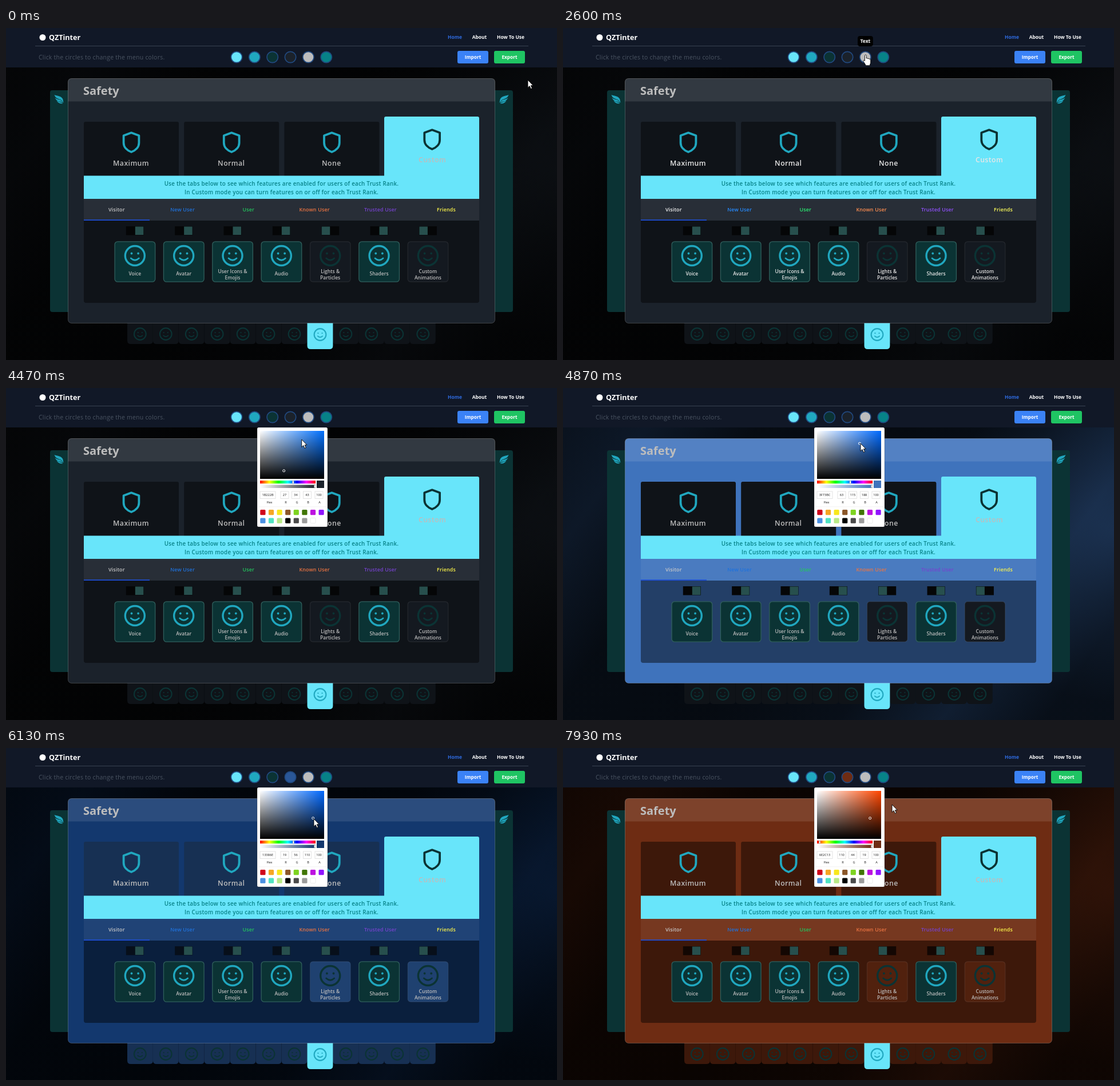
Recreate the animation shown at these times as an HTML page. Size 963 by 581 pixels, loop 8000 ms.

```html
<!DOCTYPE html>
<html lang="en">
<head>
<meta charset="utf-8">
<title>Menu colour editor</title>
<style>
html, body { margin: 0; width: 100%; height: 100%; overflow: hidden; background: #000; }
svg { display: block; width: 963px; height: 581px; font-family: "Open Sans", "Noto Sans", sans-serif; font-weight: 600; }
.bold { font-weight: 700; }
.mid { text-anchor: middle; }
.line { fill: none; stroke: currentColor; stroke-linecap: round; stroke-linejoin: round; }
.icon { color: #20a7bf; }
.dark { color: #0b3334; }
.field { fill: #fff; stroke: #ddd; stroke-width: .8; }
.tiny { font: 5.6px "Noto Sans", sans-serif; fill: #222; text-anchor: middle; }
</style>
</head>
<body>
<svg id="stage" viewBox="0 0 963 581"></svg>
<script>
const LOOP = 8000;
const stage = document.getElementById('stage');
const clamp = x => Math.max(0, Math.min(1, x));
const rgb = (c, k = 1) => `rgb(${c.map(v => Math.round(v * k))})`;
const mix = (a, b, k) => a.map((v, i) => v + (b[i] - v) * k);

const rect = (x, y, w, h, fill, r = 0, more = '') =>
  `<rect x="${x}" y="${y}" width="${w}" height="${h}" rx="${r}" fill="${fill}" ${more}/>`;
const text = (x, y, size, fill, str, cls = 'mid', gap = 0) =>
  `<text x="${x}" y="${y}" font-size="${size}" fill="${fill}" class="${cls}" letter-spacing="${gap}">${str}</text>`;
const each = (list, fn) => list.map(fn).join('');

const GREY = '#bdbdbd', CYAN = '#68e5fa', GREEN = '#0b3334', TEAL = '#078288';

// Hover groups: h0 highlight, h1 icons, h2 buttons, h3 background, h4 text, h5 accent
const swatches = [
  ['Highlight', CYAN], ['Icons', '#20a7bf'], ['Buttons', GREEN],
  ['Background', 'var(--dot)'], ['Text', GREY], ['Accent', TEAL]];
const swatchX = i => 403 + i * 31.35;

const shield = (x, y, cls) => `<path class="line ${cls}" stroke-width="3.8" transform="translate(${x} ${y})"
  d="M0-16.7L13.4-11.7V1C13.4 9 7 14.5 0 17C-7 14.5-13.4 9-13.4 1V-11.7Z"/>`;

const face = (x, y, s, cls) => `<g class="${cls}" transform="translate(${x} ${y}) scale(${s})">
  <circle class="line" r="17" stroke-width="3.4"/>
  <circle cx="-5.8" cy="-4" r="1.9" fill="currentColor"/><circle cx="5.8" cy="-4" r="1.9" fill="currentColor"/>
  <path class="line" stroke-width="2.8" d="M-7 4.5Q0 11 7 4.5"/></g>`;

const wing = (x, flip) => `<g class="h1 icon" transform="translate(${x} 117) scale(${flip} 1)" fill="currentColor">
  <path d="M0 0C5 2 13 2 15 8L16 14L12 9C7 7 2 6 0 0Z"/>
  <path d="M1 5C4 8 9 8 12 10L15 14L11 12C6 12 3 9 1 5Z"/>
  <path d="M4 10C7 12 10 12 15 15C10 16 6 14 4 10Z"/></g>`;

const button = (x, fill, label) => rect(x, 40, 54, 22, fill, 3) + text(x + 27, 54, 8.3, '#fff', label, 'mid bold');

function header() {
  return rect(0, 0, 963, 69, '#111827') + rect(51, 31, 862, 1, '#3a4353') +
    '<circle cx="64" cy="16.5" r="5.5" fill="#fff"/>' +
    text(75, 21, 12.6, '#fff', 'QZTinter', 'bold') +
    text(784.5, 19, 8.4, '#2f6be0', 'Home', 'mid bold') +
    text(827.5, 19, 8.4, '#fff', 'About', 'mid bold') +
    text(882, 19, 8.4, '#fff', 'How To Use', 'mid bold') +
    `<g font-weight="400">${text(57, 55, 10.5, '#4b5563', 'Click the circles to change the menu colors.', '', .23)}</g>` +
    each(swatches, ([, fill], i) =>
      `<circle cx="${swatchX(i)}" cy="51" r="9.7" style="fill:${fill}" stroke="#21497f" stroke-width="1.7"/>`) +
    button(789, '#3b82f6', 'Import') + button(853, '#1fc463', 'Export');
}

function levels() {
  const names = ['Maximum', 'Normal', 'None'];
  return each(names, (name, i) => {
    const x = 136 + i * 175.2;
    return `<g class="h3">${rect(x, 164, 166, 98, 'var(--card)', 3)}${shield(x + 83, 200, 'h1 icon')}
      ${text(x + 82.5, 241, 12.3, GREY, name, 'mid h4', .4)}</g>`;
  }) +
  `<g class="h0">${rect(661, 155, 166, 120, CYAN, 3)}${rect(136, 258.5, 691, 40.5, CYAN)}
    ${shield(744.7, 195, 'h2 dark')}${text(745, 234.5, 12.3, GREY, 'Custom', 'mid h4', .4)}
    <g class="h5">${text(481.5, 275.5, 9.8, TEAL, 'Use the tabs below to see which features are enabled for users of each Trust Rank.', 'mid', .25)}
    ${text(481.5, 290.5, 9.8, TEAL, 'In Custom mode you can turn features on or off for each Trust Rank.', 'mid', .25)}</g></g>`;
}

function ranks() {
  const tabs = [['Visitor', '#c8c8c8'], ['New User', '#1f72dc'], ['User', '#22c55e'],
    ['Known User', '#ec7442'], ['Trusted User', '#7642cf'], ['Friends', '#fdf64a']];
  return rect(136, 299, 691, 38, '#fff', 0, 'opacity=".055"') +
    rect(136, 335.3, 115, 1.7, '#1d4ed8') +
    each(tabs, ([name, fill], i) => text(193.3 + i * 115.25, 321, 8.8, fill, name, 'mid h4', .22));
}

function features() {
  const items = [['Voice'], ['Avatar'], ['User Icons &amp;', 'Emojis'], ['Audio'],
    ['Lights &amp;', 'Particles'], ['Shaders'], ['Custom', 'Animations']];
  return `<path d="M136 337H827V477Q827 481 823 481H140Q136 481 136 477Z" fill="var(--dim)"/>` +
    each(items, (lines, i) => {
      const x = 225.3 + i * 85.35, off = i === 4 || i === 6;
      return `<g class="h3">${rect(x - 15.5, 347, 31, 15.5, 'var(--knob)')}
        ${rect(off ? x - 15 : x + .5, 347.5, 14.5, 14.5, '#274f4d')}</g>
        <g class="${off ? 'h3' : 'h2'}">
        ${rect(x - 35.2, 373.8, 70.6, 70.4, off ? 'var(--off)' : GREEN, 5,
          off ? 'stroke="#fff" stroke-opacity=".08" stroke-width="1.2"' : 'stroke="#305f5c" stroke-width="1.3"')}
        ${face(x, 398.5, 1, off ? 'h2 dark' : 'h1 icon')}
        ${each(lines, (s, k) => text(x, (lines[1] ? 428.7 : 432.7) + k * 10.8, 8.5, GREY, s, 'mid h4'))}</g>`;
    });
}

function dock() {
  const ids = [...Array(12).keys()];
  const tab = (x, h, fill) => `<path d="M${x} 516H${x + 44.9}V${h - 6}q0 6-6 6H${x + 6}q-6 0-6-6Z" fill="${fill}"/>`;
  return `<g class="h3">${each(ids, i => tab(212 + i * 44.9, 553, 'var(--card)') +
    (i === 7 ? '' : face(234.3 + i * 44.95, 535.5, .61, 'h2 dark')))}</g>
    <g class="h0">${tab(526.5, 562, CYAN)}${face(549, 536.5, .61, 'h1 icon')}</g>`;
}

function picker() {
  const presets = ['#d0021b', '#f5a623', '#f8e71c', '#8b572a', '#7ed321', '#417505', '#bd10e0', '#9013fe',
    '#4a90e2', '#50e3c2', '#b8e986', '#000', '#4a4a4a', '#9b9b9b', '#fff'];
  const fields = [['Hex', 457.5, 27, 460.5], ['R', 487, 14, 489], ['G', 506.5, 14, 508.5], ['B', 526.5, 14, 528], ['A', 547, 14, 548]];
  return `<g id="picker">${rect(439, 69, 123, 174, '#fff', 2.5, 'stroke="#000" stroke-opacity=".2"')}
    ${rect(444, 75, 112, 84, 'var(--hue)')}${rect(444, 75, 112, 84, 'url(#white)')}${rect(444, 75, 112, 84, 'url(#black)')}
    <circle id="spot" r="2" fill="none" stroke="#fff"/>
    ${rect(444, 162, 97, 5.2, 'url(#rainbow)')}${rect(444, 169.5, 97, 5.5, 'url(#alpha)')}
    <g fill="#fff" stroke="#777" stroke-width=".4"><rect id="hueMark" y="162.3" width="2.4" height="4.8"/>
    <rect x="538.5" y="169.8" width="2.4" height="4.8"/></g>
    ${rect(543, 162, 13, 13, 'var(--bg)')}
    ${each(fields, ([name, x, w, lx]) => `<rect class="field" x="${x - w / 2}" y="181" width="${w}" height="12.5"/>
      <text class="tiny" id="in${name}" x="${x}" y="189.4"></text><text class="tiny" x="${lx}" y="202">${name}</text>`)}
    ${rect(439, 207.5, 123, .7, '#eee')}
    ${each(presets, (c, i) => rect(444.3 + i % 8 * 14.6, i < 8 ? 213 : 227.5, 9.2, 9.2, c, 1.5,
      i === 14 ? 'stroke="#ddd" stroke-width=".6"' : ''))}</g>`;
}

const stops = list => each(list, ([at, color, o = 1]) =>
  `<stop offset="${at}" style="stop-color:${color}" stop-opacity="${o}"/>`);
const tint = list => stops(list.map(([at, o]) => [at, 'var(--bg)', o]));

stage.innerHTML = `<defs>
  <linearGradient id="beam" gradientUnits="userSpaceOnUse" x1="0" y1="70" x2="800" y2="640">
    ${tint([[0, .16], [.12, .21], [.28, .1], [.5, .09], [.7, .13], [.85, .26], [1, .13]])}</linearGradient>
  <radialGradient id="glow" gradientUnits="userSpaceOnUse" cx="965" cy="250" r="300">
    ${tint([[0, .26], [.4, .14], [1, 0]])}</radialGradient>
  <linearGradient id="white">${stops([[0, '#fff'], [1, '#fff', 0]])}</linearGradient>
  <linearGradient id="black" x2="0" y2="1">${stops([[0, '#000', 0], [1, '#000']])}</linearGradient>
  <linearGradient id="alpha">${stops([[0, '#fff'], [1, 'var(--bg)']])}</linearGradient>
  <linearGradient id="rainbow">${stops([0, 1, 2, 3, 4, 5, 6].map(i => [i / 6, `hsl(${i * 60},100%,50%)`]))}</linearGradient>
  </defs>
  ${rect(0, 0, 963, 581, '#000')}${rect(0, 69, 963, 512, 'url(#beam)')}${rect(0, 69, 963, 512, 'url(#glow)')}
  ${header()}
  <g class="h2">${rect(77, 109, 40, 388, GREEN, 4)}${rect(846, 109, 40, 388, GREEN, 4)}</g>
  ${wing(84.5, 1)}${wing(878.5, -1)}
  ${dock()}
  ${rect(108.5, 88.5, 746, 428, 'var(--bg)', 6)}
  <path d="M108 128.5V94q0-6 6-6H849q6 0 6 6V128.5Z" fill="#fff" opacity=".1"/>
  ${rect(108.5, 88.5, 746, 428, 'none', 6, 'stroke="#fff" stroke-opacity=".2"')}
  ${text(135, 117, 20, GREY, 'Safety', 'bold')}
  ${levels()}${ranks()}${features()}${picker()}
  <g id="tip"><rect id="tipBox" y="14" height="18" rx="4"/><text id="tipText" class="mid bold" y="25.8" font-size="8.5" fill="#fff"></text></g>
  <g stroke="#000" fill="#fff" stroke-linejoin="round">
  <path id="arrow" stroke-width=".9" d="M0 0V13.4L3.1 10.5L5.3 15.5L7.5 14.5L5.4 9.7H9.3Z"/>
  <path id="hand" stroke-width=".9" d="M-1.6 1.5C-1.6-.5 1.2-.5 1.2 1.5V6.2C2-.1+5 3.8 5.8 3.8 7C5 6 6.2 6.3 6.4 7.6C7.6 6.8 8.7 7.4 8.7 9V13C8.7 15 7.5 16 7.3 18.8H0C-.4 16-3.6 13-4.2 10.6C-4.4 9.2-2.8 8.8-1.6 10.6Z"/></g>`;

const $ = id => document.getElementById(id);
$('hand').setAttribute('d', 'M-1.6 1.5C-1.6-.5 1.2-.5 1.2 1.5V6.2C2 5 3.7 5.6 3.8 7C5 6 6.2 6.3 6.4 7.6C7.6 6.8 8.7 7.4 8.7 9V13C8.7 15 7.5 16 7.3 18.8H0C-.4 16-3.6 13-4.2 10.6C-4.4 9.2-2.8 8.8-1.6 10.6Z');
const groups = swatches.map((_, i) => document.querySelectorAll('.h' + i));

// [time, x, y] of the pointer tip
const track = [[0, 912, 91], [230, 912, 91], [560, 690, 84], [900, 405, 50], [1060, 436, 50], [1270, 466, 49],
  [1530, 466, 49], [2000, 497, 49], [2200, 497, 49], [2600, 529, 47], [2800, 529, 47], [3030, 559, 50],
  [3300, 528, 52], [3600, 501, 55], [3730, 500, 55], [4100, 500, 55], [4600, 520, 97], [5230, 520, 97],
  [5370, 502, 112], [5540, 532, 137], [5680, 546, 132], [5800, 538, 124], [6200, 538, 124],
  [6870, 450, 166], [7300, 450, 166], [7930, 575, 99], [8000, 575, 99]];
// [swatch, enter, leave]
const hovers = [[5, 790, 810], [0, 870, 960], [1, 970, 1060], [2, 1080, 1640], [3, 1740, 2300],
  [4, 2370, 2860], [5, 2910, 3130], [4, 3200, 3340], [3, 3430, 4220]];
const lift = [.2, .3, .4, .42, .22, .3];
const picks = [[0, [27, 34, 43]], [4860, [63, 115, 188]], [6060, [19, 56, 110]], [7190, [110, 44, 19]]];

function pointer(t) {
  const i = Math.max(1, track.findIndex(k => k[0] >= t));
  const [a, b] = [track[i - 1], track[i]];
  const k = clamp((t - a[0]) / (b[0] - a[0]));
  const e = k * k * (3 - 2 * k);
  return [a[1] + (b[1] - a[1]) * e, a[2] + (b[2] - a[2]) * e];
}

function hsv([r, g, b]) {
  const v = Math.max(r, g, b), d = v - Math.min(r, g, b);
  const h = v === r ? (g - b) / d : v === g ? 2 + (b - r) / d : 4 + (r - g) / d;
  return [(h * 60 + 360) % 360, d / v, v / 255];
}

function setAttrs(id, attrs) {
  for (const k in attrs) $(id).setAttribute(k, attrs[k]);
}

function showPicker(t, color) {
  $('picker').style.display = t >= 3925 ? '' : 'none';
  const [h, s, v] = hsv(color);
  stage.style.setProperty('--hue', `hsl(${h},100%,50%)`);
  setAttrs('spot', { cx: 444 + s * 112, cy: 159 - v * 84 });
  setAttrs('hueMark', { x: 443 + h / 360 * 97 });
  $('inHex').textContent = color.map(c => c.toString(16).padStart(2, '0')).join('').toUpperCase();
  ['R', 'G', 'B'].forEach((n, i) => $('in' + n).textContent = color[i]);
  $('inA').textContent = 100;
}

function showTip(t) {
  const hover = hovers.find(([, a, b]) => t >= a + 110 && t < b + 60);
  $('tip').style.display = hover ? '' : 'none';
  if (!hover) return;
  const [id, a, b] = hover, x = swatchX(id);
  $('tip').style.opacity = clamp((t - a - 90) / 80) * clamp((b + 60 - t) / 60);
  $('tipText').textContent = swatches[id][0];
  const w = $('tipText').getComputedTextLength() + 9;
  setAttrs('tipText', { x });
  setAttrs('tipBox', { x: x - w / 2, width: w });
}

function draw(t) {
  let i = picks.length - 1;
  while (picks[i][0] > t) i--;
  const color = picks[i][1];
  const lag = i ? mix(picks[i - 1][1], color, clamp((t - picks[i][0] - 15) / 120)) : color;
  const vars = { bg: rgb(color), dim: rgb(color, .55), card: rgb(lag, .55), off: rgb(lag, .74), knob: rgb(lag, .17), dot: rgb(lag) };
  for (const k in vars) stage.style.setProperty('--' + k, vars[k]);

  groups.forEach((els, g) => {
    const level = Math.max(0, ...hovers.filter(h => h[0] === g)
      .map(([, a, b]) => clamp((Math.min(t, b) - a) / 180) * clamp(1 - (t - b) / 180)));
    const filter = level ? `brightness(${1 + lift[g] * level})` : 'none';
    els.forEach(el => el.style.filter = filter);
  });

  showPicker(t, color);
  showTip(t);
  const [x, y] = pointer(t), hand = t > 870 && t < 4300;
  setAttrs('arrow', { transform: `translate(${x} ${y})`, display: hand ? 'none' : 'inline' });
  setAttrs('hand', { transform: `translate(${x} ${y})`, display: hand ? 'inline' : 'none' });
}

const start = performance.now();
function tick() {
  draw((performance.now() - start) % LOOP);
  requestAnimationFrame(tick);
}
draw(0);
requestAnimationFrame(tick);
</script>
</body>
</html>
```
